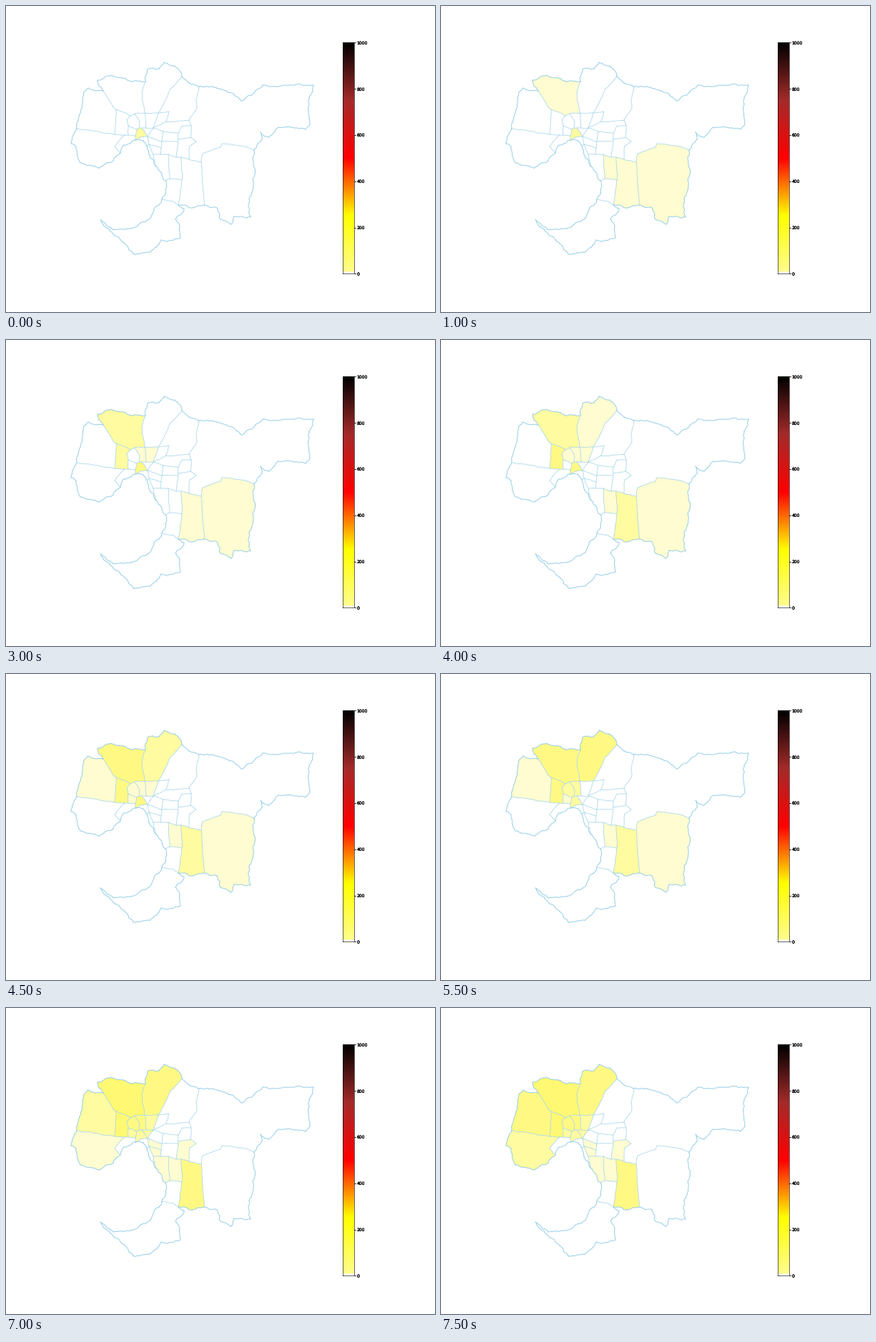
These frames come from a looping animation (600 by 429 pixels, 8000 ms). A matplotlib script:

```python
import math
import random

import matplotlib.pyplot as plt
import numpy as np
from matplotlib.animation import FuncAnimation
from matplotlib.collections import LineCollection, PolyCollection
from matplotlib.colors import LinearSegmentedColormap

W, H, DPI = 600, 429, 64
PX = 72 / DPI
STEPS, STEP_MS = 16, 500
LEVELS = ["#ffffff", "#fefcd0", "#fffba0", "#fff984", "#fff872"]
SCALE = [(0, "#ffffff"), (0.005, "#ffffff"), (0.007, "#fffc8c"), (0.25, "#ffff00"),
         (0.5, "#ff0000"), (0.75, "#a52a2a"), (1, "#000000")]

# Key points of the outer ring, clockwise from the north-west
COAST = [
    (109, 121), (115, 115), (136, 119), (128, 104), (143, 98), (174, 106), (195, 106),
    (198, 89), (214, 88), (221, 79), (236, 84), (246, 99), (256, 108), (270, 113),
    (289, 113), (308, 119), (329, 133), (349, 119), (359, 111), (430, 111), (424, 128),
    (425, 165), (419, 173), (381, 170), (368, 184), (356, 177), (358, 187), (347, 202),
    (348, 235), (340, 270), (342, 296), (319, 295), (315, 306), (300, 299), (295, 283),
    (277, 279), (261, 283), (241, 279), (249, 284), (237, 299), (243, 310), (244, 325),
    (217, 328), (202, 345), (178, 348), (166, 333), (132, 300), (150, 314), (175, 312),
    (197, 301), (212, 280), (218, 271), (223, 263), (223, 245), (210, 225), (201, 210),
    (197, 196), (192, 189), (181, 188), (165, 195), (160, 206), (150, 217), (131, 227),
    (104, 220), (98, 197), (91, 193), (99, 172),
]


def shore(a, b):
    """Part of the ring from a clockwise to b."""
    i, j = COAST.index(a), COAST.index(b)
    return COAST[i:j + 1] if i < j else COAST[i:] + COAST[:j + 1]


# Each area: outline, steps where its level rises, steps where it falls
AREAS = [
    (shore((136, 119), (195, 106)) + [  # Hume
        (190, 121), (194, 150), (180, 151), (174, 154), (154, 145), (150, 142)],
     (1, 5, 6, 9, 14), (4,)),
    (shore((99, 172), (136, 119)) + [(150, 142), (154, 145), (152, 180)],  # Melton
     (9, 13, 15), ()),
    (shore((160, 206), (99, 172)) + [(152, 180), (166, 181), (152, 197)],  # Wyndham
     (13, 15), ()),
    ([(154, 145), (174, 154), (169, 160), (171, 168), (171, 181),  # Brimbank
      (166, 181), (152, 180)],
     (6, 6, 8, 14), ()),
    (shore((195, 106), (246, 99)) + [  # Whittlesea
        (230, 116), (221, 136), (213, 150), (194, 150), (190, 121)],
     (7, 9, 11), ()),
    ([(174, 154), (180, 151), (187, 163), (186, 171), (183, 173),  # Moonee Valley
      (171, 168), (169, 160)],
     (8, 10, 12), ()),
    ([(180, 151), (194, 150), (196, 171), (190, 171), (186, 171), (187, 163)],  # Moreland
     (6, 10, 12), ()),
    ([(194, 150), (213, 150), (206, 171), (196, 171)],  # Darebin
     (4, 13, 14), (11,)),
    ([(171, 168), (183, 173), (181, 182), (171, 181)],  # Maribyrnong
     (9, 13), ()),
    ([(183, 173), (186, 171), (190, 171), (194, 176), (198, 183),  # Melbourne
      (188, 184), (181, 188), (181, 182)],
     (0, 0, 4), (10,)),
    ([(190, 171), (196, 171), (206, 171), (198, 183), (194, 176)],  # Yarra
     (13, 14), ()),
    ([(198, 183), (218, 190), (217, 199), (200, 194)],  # Stonnington
     (14,), ()),
    ([(200, 194), (217, 199), (216, 208), (206, 208)],  # Glen Eira
     (14,), ()),
    (shore((223, 245), (210, 225)) + [  # Kingston
        (206, 208), (216, 208), (227, 208), (229, 242)],
     (14,), ()),
    ([(227, 208), (238, 212), (245, 212), (246, 244), (229, 242)],  # Greater Dandenong
     (2, 8), (3,)),
    ([(241, 187), (258, 184), (266, 190), (257, 196), (256, 215),  # Knox
      (245, 212), (238, 212)],
     (12,), ()),
    (shore((277, 279), (241, 279)) + [  # Casey
        (246, 244), (245, 212), (256, 215), (273, 219), (275, 250)],
     (1, 7, 12), ()),
    (shore((347, 202), (277, 279)) + [  # Cardinia
        (275, 250), (273, 219), (275, 207), (300, 198), (302, 193), (338, 198)],
     (1,), (14,)),
]
# Borders between areas that stay empty
BORDERS = [
    [(270, 113), (266, 133), (267, 143), (256, 160), (259, 168), (258, 184)],
    [(213, 150), (228, 148), (224, 162), (206, 171), (220, 176), (241, 178),
     (246, 168), (259, 168)],
    [(224, 162), (256, 160)],
    [(220, 176), (218, 190), (240, 190)],
    [(241, 178), (241, 187)],
    [(197, 196), (200, 194)],
    [(218, 271), (234, 274), (241, 279)],
]


def pairs(pts):
    return [(min(e), max(e)) for e in zip(pts, pts[1:])]


def wobble(p, q, amp, rng):
    """Midpoint displacement between p and q, without q."""
    dx, dy = q[0] - p[0], q[1] - p[1]
    length = math.hypot(dx, dy)
    if length < 2.5:
        return [p]
    off = amp * rng.uniform(-1, 1) * min(length, 14) / length
    mid = ((p[0] + q[0]) / 2 - dy * off, (p[1] + q[1]) / 2 + dx * off)
    return wobble(p, mid, amp, rng) + wobble(mid, q, amp, rng)


coast_edges = set(pairs(COAST + COAST[:1]))
inner_edges = {e for pts in [a[0] + a[0][:1] for a in AREAS] + BORDERS
               for e in pairs(pts)} - coast_edges


def lines(edges, amp):
    return {e: wobble(*e, amp, random.Random(str(e))) + [e[1]] for e in edges}


coast, inner = lines(coast_edges, 0.15), lines(inner_edges, 0.05)
paths = {**coast, **inner}


def outline(pts):
    out = []
    for a, e in zip(pts, pairs(pts + pts[:1])):
        out += paths[e] if e[0] == a else paths[e][::-1]
    return out


fig = plt.figure(figsize=(W / DPI, H / DPI), dpi=DPI, facecolor="white")
plt.rcParams["text.hinting"] = "none"
ax = fig.add_axes([0, 0, 1, 1])
ax.axis("off")

fills = ax.add_collection(PolyCollection([outline(a[0]) for a in AREAS],
                                         edgecolors="none"))
for group, color, width in ((inner, "#a9d7ea", 0.8), (coast, "#93cde7", 0.95)):
    ax.add_collection(LineCollection(list(group.values()), colors=color,
                                     linewidths=width * PX, capstyle="round"))

# Colour scale
left, right, bottom, top = 470.5, 486.5, 375.3, 51.4
cmap = LinearSegmentedColormap.from_list("heat", SCALE, N=512)
ax.imshow(np.linspace(0, 1, 512)[:, None], cmap=cmap, aspect="auto",
          extent=(left, right, bottom, top), origin="lower")
ax.plot([left, right, right, left, left], [bottom, bottom, top, top, bottom],
        color="black", lw=0.6 * PX)
for value in range(0, 1001, 200):
    y = bottom + (top - bottom) * value / 1000
    ax.plot([right, right + 2.5], [y, y], color="black", lw=0.8 * PX)
    for _ in range(3):  # stacked for a denser look
        ax.text(right + 4, y, str(value), family="DejaVu Sans", size=5.95 * PX,
                va="center_baseline")

ax.set_xlim(0, W)
ax.set_ylim(H, 0)


def level(step, rises, falls):
    return sum(s <= step for s in rises) - sum(s <= step for s in falls)


def draw(step):
    fills.set_facecolor([LEVELS[level(step, up, down)] for _, up, down in AREAS])
    return [fills]


anim = FuncAnimation(fig, draw, frames=STEPS, init_func=lambda: draw(0),
                     interval=STEP_MS, repeat=True, repeat_delay=0)
plt.show()
```
